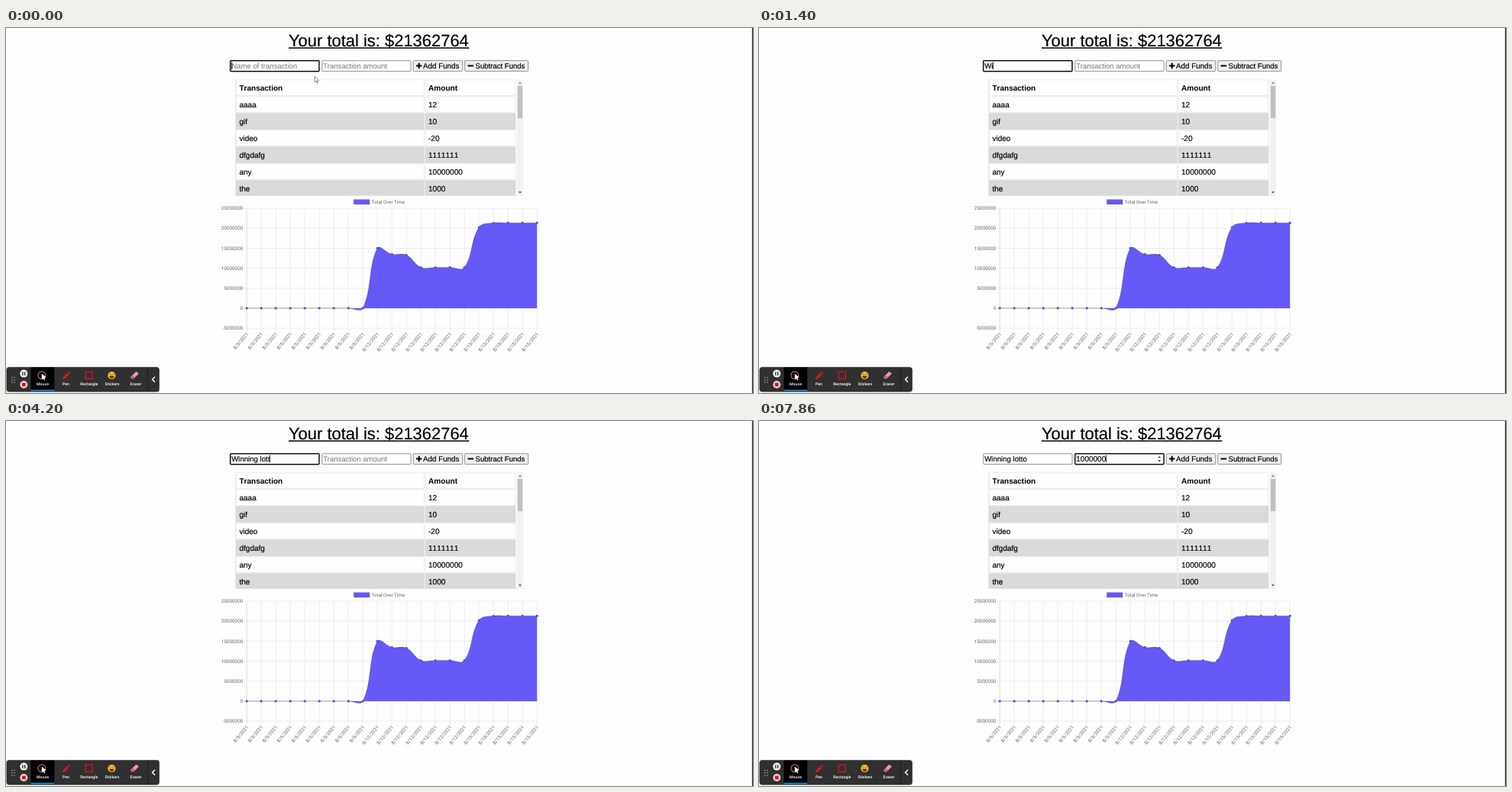
An HTML page that plays this animation: 978x478 px, repeating every 8000 ms.

```html
<!DOCTYPE html>
<html lang="en">
<head>
<meta charset="utf-8">
<style>
  html, body { margin: 0; width: 100%; height: 100%; overflow: hidden; background: #fdfdfd; }
  svg { display: block; width: 978px; height: 478px; }
  text { font-family: "Liberation Sans", Arial, sans-serif; white-space: pre; text-rendering: geometricPrecision; }
  .heavy { stroke: #000; stroke-width: .18px; }
  .cells text { font-kerning: none; }
  .ui text { font-family: Roboto, sans-serif; }
</style>
</head>
<body>
<svg id="stage" viewBox="0 0 978 478"></svg>
<script>
const stage = document.getElementById('stage');
const LOOP = 8000, BLINK = 530;

// ---------- markup helpers ----------
const rect = (x, y, w, h, fill, extra = '') =>
  `<rect x="${x}" y="${y}" width="${w}" height="${h}" fill="${fill}" ${extra}/>`;
const text = (x, y, size, str, fill = '#000', extra = '') =>
  `<text x="${x}" y="${y}" font-size="${size}" fill="${fill}" ${extra}>${str}</text>`;
const path = (d, fill, extra = '') => `<path d="${d}" fill="${fill}" ${extra}/>`;
const line = (d, color, width = 1, extra = '') =>
  path(d, 'none', `stroke="${color}" stroke-width="${width}" ${extra}`);
const circle = (x, y, r, fill, extra = '') => `<circle cx="${x}" cy="${y}" r="${r}" fill="${fill}" ${extra}/>`;
const group = (name, content) => `<g class="${name}">${content}</g>`;
const range = n => [...Array(n).keys()];

function header() {
  const button = (x, w) => rect(x, 42.7, w, 14, '#efefef', 'stroke="#858585" stroke-width=".9" rx="1.3"');
  return group('heavy', text(370, 23.9, 21.95, 'Your total is: $21362764')) +
    rect(370, 25.4, 236.3, 1.5, '#000') +
    button(533.2, 64.6) + button(600.7, 83) +
    line('M537 49.5h7.4M540.7 45.8v7.4', '#000', 2) + line('M604.5 49.5h7.6', '#000', 2) +
    group('heavy', text(546, 53, 9.8, 'Add Funds') + text(614.6, 53, 9.55, 'Subtract Funds'));
}

function table() {
  const rows = [['aaaa', '12'], ['gif', '10'], ['video', '-20'], ['dfgdafg', '1111111'],
    ['any', '10000000'], ['the', '1000']];
  const cell = (x, y, w, shaded) =>
    rect(x, y, w, 20.6, shaded ? '#dadada' : '#fefefe', `stroke="${shaded ? '#d6d6d6' : '#e6e6e6'}" stroke-width=".8"`);
  const row = ([name, amount], i) => {
    const y = 67.9 + 22 * i, shaded = i > 0 && i % 2 === 0;
    const style = i ? 'class="heavy"' : 'font-weight="bold"';
    return cell(301.5, y, 245.7, shaded) + cell(549, y, 118, shaded) +
      text(305.5, y + 13.7, 10, name, '#000', style) + text(553, y + 13.7, 10.1, amount, '#000', style);
  };
  return '<clipPath id="view"><rect x="299" y="67" width="380" height="152.8"/></clipPath>' +
    '<g class="cells" clip-path="url(#view)">' + line('M300.3 67v154', '#e8e8e8', .8) +
    [['Transaction', 'Amount'], ...rows].map(row).join('') +
    rect(669, 67.5, 8, 152.3, '#f1f1f1') + rect(669.8, 75.8, 6.4, 42.4, '#c1c1c1') +
    path('M671 73l2-2.4 2 2.4z', '#858585') + path('M671 214.2l2 2.4 2-2.4z', '#444') + '</g>';
}

function chart() {
  const left = 315.2, step = 19, zero = 366.9, unit = 26.15;
  const xs = range(21).map(i => left + i * step);
  const millions = [...Array(9).fill(0), 15, 13.5, 13.3, 10.2, 10.2, 10.2, 10.2, 20.25, 21.35, 21.36, 21.36, 21.36];
  const pts = millions.map((m, i) => [xs[i], zero - m / 5 * unit]);

  // Cardinal spline whose handles are weighted by the neighbouring segment lengths.
  const handles = pts.map((p, i) => {
    const a = pts[Math.max(i - 1, 0)], b = pts[Math.min(i + 1, pts.length - 1)];
    const d0 = Math.hypot(p[0] - a[0], p[1] - a[1]), d1 = Math.hypot(b[0] - p[0], b[1] - p[1]);
    const at = k => [p[0] + k * (b[0] - a[0]), p[1] + k * (b[1] - a[1])];
    return [at(-.4 * d0 / (d0 + d1)), at(.4 * d1 / (d0 + d1))];
  });
  const curve = 'M' + pts[0] + pts.slice(1).map((p, i) =>
    `C${handles[i][1]} ${handles[i + 1][0]} ${p}`).join('');

  const levels = range(7).map(i => {
    const y = 236.1 + i * unit;
    return line(`M310.5 ${y}H${xs[20]}`, i === 5 ? '#bdbdbd' : '#e5e5e5', .7) +
      text(310.3, y + 2.2, 6.36, 25000000 - i * 5000000, '#666', 'text-anchor="end"');
  }).join('');
  const dates = xs.map((x, i) => {
    const day = i < 9 ? 5 : i < 16 ? 12 : 15;
    return line(`M${x} 236.1V397.8`, i ? '#e5e5e5' : '#cfcfcf', .7) +
      text(0, 2.2, 6.36, `8/${day}/2021`, '#666', `text-anchor="end" transform="translate(${x + .8} 399.6) rotate(-50)"`);
  }).join('');

  return group('ui', rect(455.3, 224.6, 20.8, 6.4, '#6759f7', 'stroke="#000" stroke-opacity=".1" stroke-width="1.2"') +
    text(478.7, 229.8, 6.2, 'Total Over Time', '#666') + levels + dates +
    path(`${curve}V${zero}H${left}Z`, '#6759f7') +
    line(curve, 'rgba(0,0,0,.13)', 1.6) +
    pts.map(p => circle(p[0], p[1], 1.6, '#5a4ddb')).join(''));
}

function toolbar() {
  const label = (x, str) => text(x, 468.2, 5.2, str, '#fff', 'text-anchor="middle" font-weight="500"');
  const red = '#d5142a';
  return group('ui', rect(.5, 445, 200.5, 32.2, '#000', 'rx="3" opacity=".14"') +
    rect(1, 444.4, 199.3, 31.7, '#303030', 'rx="3" stroke="#222" stroke-width=".8"') +
    range(6).map(i => circle(7.8 + i % 2 * 3.2, 457.6 + (i >> 1) * 3.2, .75, '#bbb')).join('') +
    circle(23.3, 452.6, 5, '#f3f3f3') + line('M21.9 450.2v4.8M24.7 450.2v4.8', '#222', 1.3) +
    circle(23.3, 467, 5, '#eccaca') + rect(21, 464.7, 4.6, 4.6, red, 'rx=".5"') +
    rect(32.5, 444.4, 30.8, 31.6, '#000') + rect(32.5, 473.8, 30.8, 1.7, '#13a3d8') +
    circle(46.8, 454.8, 4.9, 'none', 'stroke="#c76c70" stroke-width="1.1"') +
    path('M46.8 452.5l5.8 5-2.6.4 1.4 2.7-1.3.7-1.4-2.8-1.9 1.9z', '#fff') +
    path('M74.2 460.2l.8-3.4 4.7-4.8 2.6 2.4-4.8 4.8z', red) + path('M80.5 451.2l1.4-1.4 2.4 2.3-1.3 1.5z', red) +
    rect(104.2, 450.3, 9, 9.2, 'none', `stroke="${red}" stroke-width="1.3"`) +
    circle(138.4, 455, 5.1, '#f8c33b') + path('M135.2 455.6h6.4q-.4 3.4-3.2 3.4t-3.2-3.4z', '#6b3414') +
    line('M135 453.6l1.4-1 1.3 1M139.2 453.6l1.3-1 1.4 1', '#65380f', .8) +
    path('M163.6 456.5l6.8-6.7 3.5 2.7-6.7 6.8h-2.6l-1.3-1.5z', '#eb9baa') +
    path('M163.6 456.5l2-2 3.6 2.9-2 1.9h-2.6l-1.3-1.5z', '#ca6674') +
    label(48, 'Mouse') + label(78.4, 'Pen') + label(108.8, 'Rectangle') + label(139, 'Stickers') + label(170, 'Eraser') +
    line('M185.3 444.4v31.6', '#1c1c1c', .9) + line('M195 456.7l-3.5 3.5 3.5 3.5', '#fff', 1.4));
}

// ---------- form fields ----------
const fields = [
  { x: 293.7, hint: 'Name of transaction', size: 9.62, hintSize: 9.6, value: 'Winning lotto',
    focus: 0, blur: 4730, keys: [1200, 1330, 1600, 1800, 2000, 2200, 2400, 2730, 3600, 3800, 4060, 4200, 4260] },
  { x: 413.8, hint: 'Transaction amount', size: 10, hintSize: 9.5, value: '1000000', spinner: true,
    focus: 4730, blur: LOOP, keys: [5730, 5930, 6060, 6200, 6330, 6460, 6730] }
];

const fieldMarkup = f => `<g class="field">${rect(f.x, 42.8, 116.3, 13.9, '#fff', 'rx="1"')}` +
  text(f.x + 1.5, 53, f.size, '') + rect(0, 44.6, .8, 10, '#000') +
  (f.spinner ? `<g>${path('M522.2 48.3l2-2.4 2 2.4z', '#444')}${path('M522.2 51l2 2.4 2-2.4z', '#444')}</g>` : '') + '</g>';

stage.innerHTML = rect(0, 0, 978, 478, '#fdfdfd') + header() + fields.map(fieldMarkup).join('') +
  table() + chart() + toolbar() + rect(976.8, 0, 1.2, 478, '#222') +
  path('M404.2 63.4v7.6l1.7-1.5 1.2 2.7 1.2-.5-1.1-2.7h2.2z', '#fff', 'id="pointer" stroke="#555" stroke-width=".7"');

const pointer = document.getElementById('pointer');
stage.querySelectorAll('.field').forEach((g, i) => {
  [fields[i].box, fields[i].label, fields[i].caret, fields[i].arrows] = g.children;
});

const show = (el, on) => el.setAttribute('visibility', on ? 'visible' : 'hidden');

function drawField(f, t) {
  const typed = f.keys.filter(k => k <= t).length;
  const focused = t >= f.focus && t < f.blur;
  f.box.setAttribute('stroke', focused ? '#101010' : '#858585');
  f.box.setAttribute('stroke-width', focused ? 1.5 : .9);
  f.label.textContent = typed ? f.value.slice(0, typed) : f.hint;
  f.label.setAttribute('fill', typed ? '#000' : '#757575');
  f.label.setAttribute('font-size', typed ? f.size : f.hintSize);
  f.label.setAttribute('class', typed ? 'heavy' : '');

  // The caret restarts its blink after every key.
  const since = t - (typed ? f.keys[typed - 1] : f.focus);
  f.caret.setAttribute('x', f.x + 1.3 + (typed ? f.label.getComputedTextLength() : 0));
  show(f.caret, focused && Math.floor(since / BLINK) % 2 === 0);
  if (f.arrows) show(f.arrows, focused);
}

function frame() {
  const t = performance.now() % LOOP;
  fields.forEach(f => drawField(f, t));
  show(pointer, t < fields[0].keys[0]);
  requestAnimationFrame(frame);
}
frame();
</script>
</body>
</html>
```
